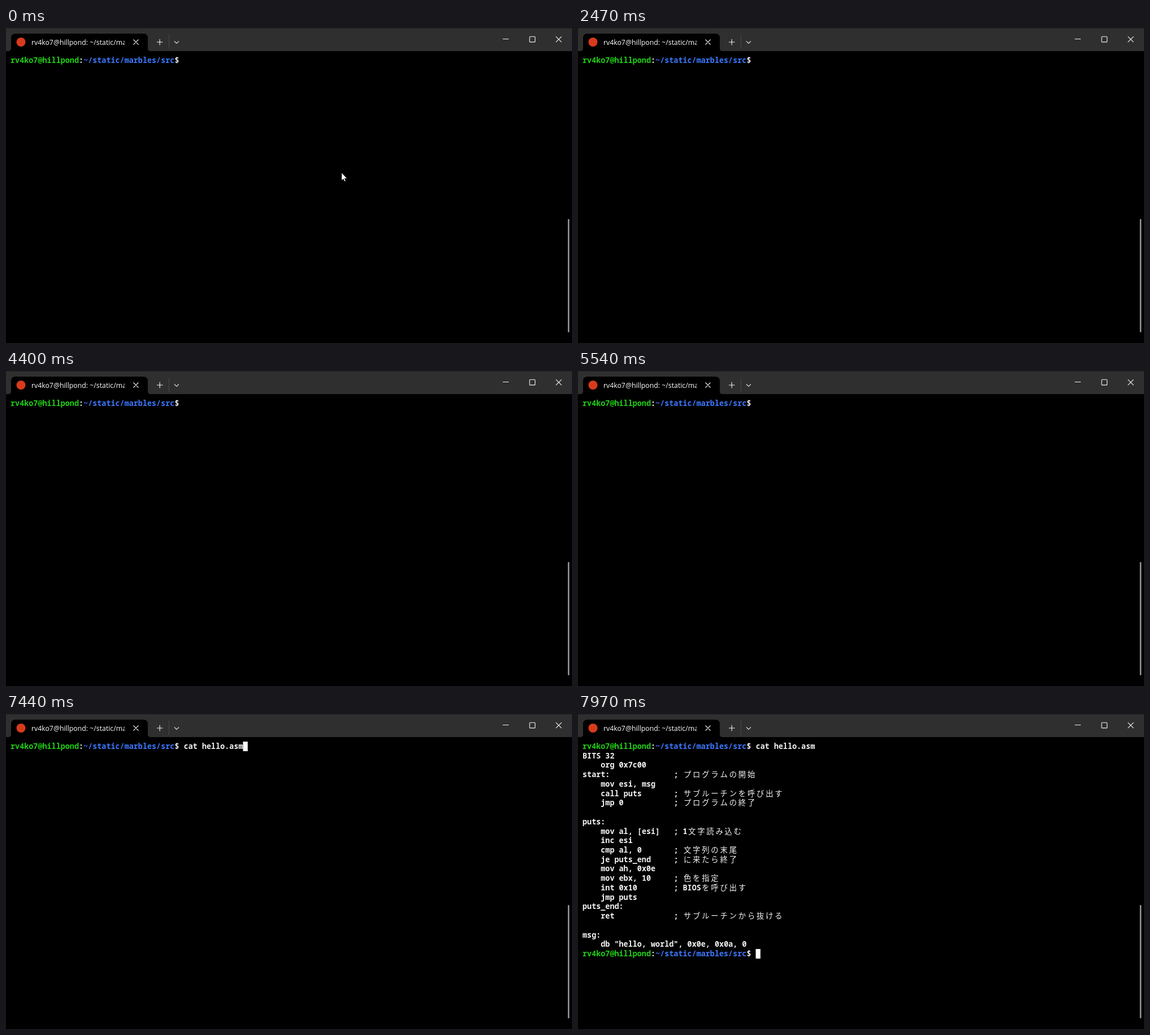
Write an HTML page that moves like this. It is 1002x559 px and loops after 8000 ms.

```html
<!DOCTYPE html>
<html lang="en">
<head>
<meta charset="utf-8">
<title>Terminal</title>
<style>
  html, body { margin: 0; width: 100%; height: 100%; overflow: hidden; background: #000; }
  svg { display: block; width: 100vw; height: 100vh; }
  .mono { font: 600 13.45px "Noto Sans Mono", "DejaVu Sans Mono", monospace; }
  .cjk { font: 400 13.4px "Noto Sans CJK JP", "Noto Sans CJK", sans-serif; }
  .title { font: 500 12.3px "Open Sans", "Noto Sans", sans-serif; }
  .line { fill: none; stroke: #f4f4f4; stroke-width: 1.1; }
</style>
</head>
<body>
<svg viewBox="0 0 1002 559">
  <defs><clipPath id="titleClip"><rect x="44" y="14" width="166.5" height="24"/></clipPath></defs>
  <rect width="1002" height="559"/>
  <rect width="1002" height="41" fill="#2f2f2f"/>
  <rect width="1002" height="1" fill="#222"/>
  <path d="M4 41Q9 41 9 36V18Q9 10 17 10H243Q251 10 251 18V36Q251 41 256 41Z"/>
  <circle cx="26.5" cy="25" r="8" fill="#d83b1c"/>
  <g clip-path="url(#titleClip)"><text class="title" id="title" x="45" y="30" fill="#fff"></text></g>
  <path class="line" d="M225.5 20.5l9 9m0-9l-9 9M267 25h10.5M272.2 19.7v10.5M298 23.3l4 4 4-4"/>
  <path d="M288.5 12v25" stroke="#484848"/>
  <path class="line" d="M879.5 19.5h10.5M973.5 15.2l10 10m0-10l-10 10"/>
  <rect class="line" x="927" y="15.3" width="9.6" height="9.6" rx="1"/>
  <rect x="994.7" y="339" width="2.5" height="201" rx="1" fill="#9a9a9a"/>
  <g id="first"></g>
  <g id="typed"></g>
  <g id="output"></g>
  <rect id="caret" width="8.3" height="17" fill="#fff"/>
  <path id="pointer" d="M594.2 257v13.6l3.1-2.9 2 4.5 2-.9-2-4.4h4.3Z" fill="#fff" stroke="#111" stroke-width=".5"/>
</svg>
<script>
const LOOP = 8000, CELL = 8.07, ROW = 16.73, LEFT = 8, PROMPT_COLS = 38;
const WHITE = '#f2f2f2', GREEN = '#1fd015', BLUE = '#3b78ff';
const USER = 'rv4ko7@hillpond', PATH = '~/static/marbles/src', COMMAND = 'cat hello.asm';
const $ = id => document.getElementById(id);

const LISTING = `BITS 32
    org 0x7c00
start:              ; プログラムの開始
    mov esi, msg
    call puts       ; サブルーチンを呼び出す
    jmp 0           ; プログラムの終了

puts:
    mov al, [esi]   ; 1文字読み込む
    inc esi
    cmp al, 0       ; 文字列の末尾
    je puts_end     ; に来たら終了
    mov ah, 0x0e
    mov ebx, 10     ; 色を指定
    int 0x10        ; BIOSを呼び出す
    jmp puts
puts_end:
    ret             ; サブルーチンから抜ける

msg:
    db "hello, world", 0x0e, 0x0a, 0`.split('\n');

// Places text on the cell grid; wide characters take two cells.
function put(group, text, col, row, fill = WHITE) {
  for (const [run] of text.matchAll(/ +|[!-~]+|[^ -~]/g)) {
    const wide = run.charCodeAt(0) > 126;
    if (run[0] !== ' ') {
      const el = document.createElementNS('http://www.w3.org/2000/svg', 'text');
      el.setAttribute('class', wide ? 'cjk' : 'mono');
      el.setAttribute('x', LEFT + col * CELL + (wide ? 1.4 : 0));
      el.setAttribute('y', 62 + row * ROW);
      el.setAttribute('fill', fill);
      el.textContent = run;
      group.append(el);
    }
    col += wide ? 2 : run.length;
  }
}

function putPrompt(group, row) {
  put(group, USER, 0, row, GREEN);
  put(group, ':', USER.length, row);
  put(group, PATH, USER.length + 1, row, BLUE);
  put(group, '$', PROMPT_COLS - 2, row);
}

$('title').textContent = `${USER}: ${PATH}`;
const LAST_ROW = LISTING.length + 1;
putPrompt($('first'), 0);
LISTING.forEach((line, i) => put($('output'), line, 0, i + 1));
putPrompt($('output'), LAST_ROW);

const RUN_AT = 7540;
const KEYS = [...Array.from({ length: 8 }, (_, i) => 5590 + i * 55), 6970, 6970, 7030, 7080, 7140];
const CARET_ON = [[800, 930], [1930, 1970], [2970, 3030], [3400, 3430], [3900, 4130],
  [4430, 4970], [5570, 6400], [6540, LOOP]];

const show = (id, on) => $(id).setAttribute('visibility', on ? 'visible' : 'hidden');
let shown = -1;

function render(t) {
  const count = KEYS.filter(k => t >= k).length;
  const done = t >= RUN_AT;
  if (count !== shown) {
    $('typed').replaceChildren();
    put($('typed'), COMMAND.slice(0, count), PROMPT_COLS, 0);
    shown = count;
  }
  const col = PROMPT_COLS + (done ? 0 : count);
  $('caret').setAttribute('x', LEFT + col * CELL);
  $('caret').setAttribute('y', 49 + (done ? LAST_ROW * ROW : 0));
  show('caret', CARET_ON.some(([a, b]) => t >= a && t < b));
  show('output', done);
  show('pointer', t < 800);
}

const start = performance.now();
function tick() {
  render((performance.now() - start) % LOOP);
  requestAnimationFrame(tick);
}
render(0);
requestAnimationFrame(tick);
</script>
</body>
</html>
```
